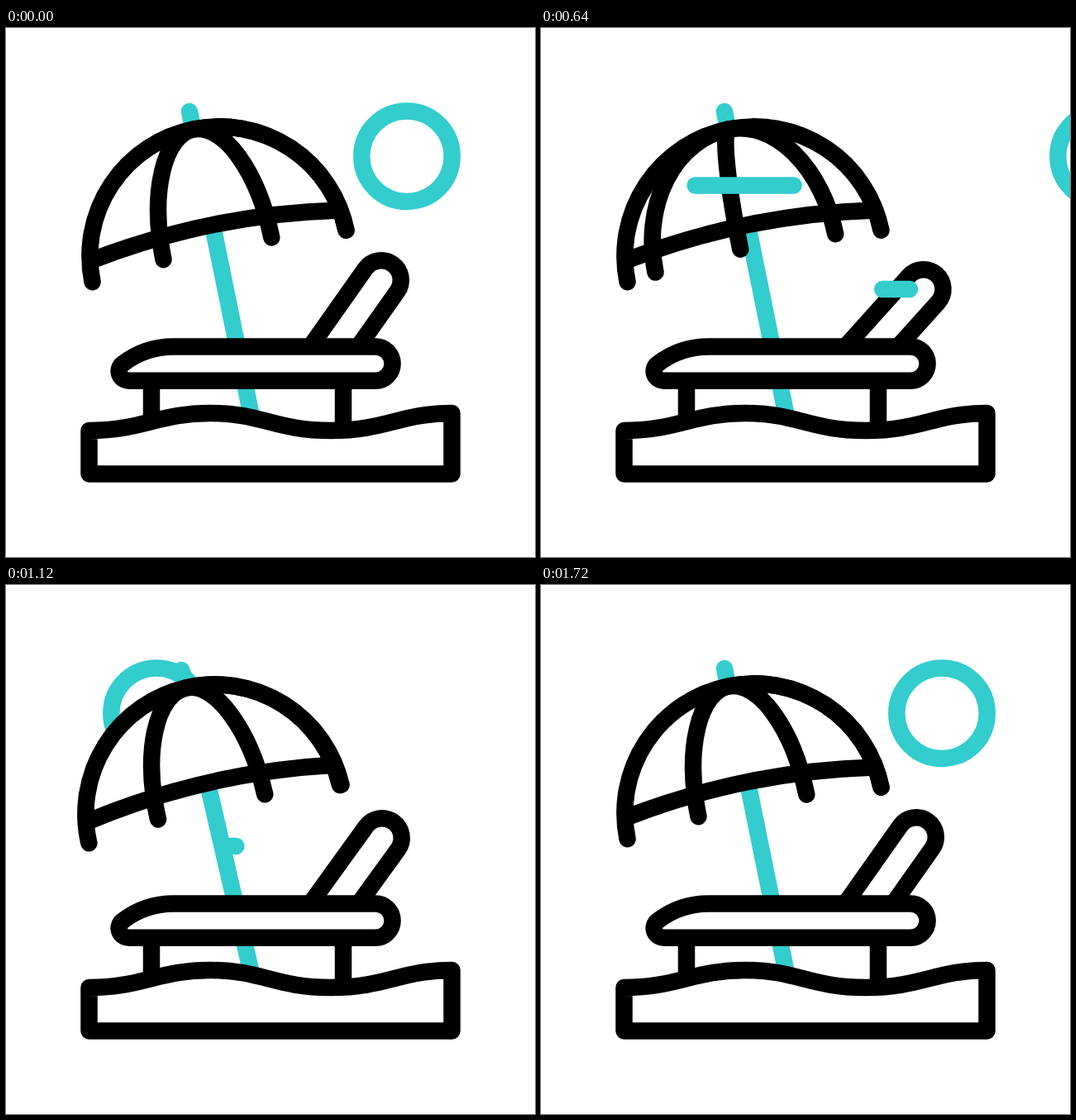
Write an HTML page that moves like this. It is 640 by 640 pixels and loops after 2000 ms.

```html
<!DOCTYPE html>
<html lang="en">
<head>
<meta charset="utf-8">
<title>Beach lounger</title>
<style>
  html, body { margin: 0; width: 100%; height: 100%; overflow: hidden; background: #fff; }
  svg { display: block; width: 100vw; height: 100vh; }
  .ink, .aqua { fill: none; stroke: #000; stroke-width: 20.5; stroke-linejoin: round; }
  .aqua { stroke: #33cdcd; }
  .round { stroke-linecap: round; }
  .solid { fill: #fff; }
</style>
</head>
<body>
<svg viewBox="0 0 640 640">
  <circle id="sun" class="aqua" cy="155.2" r="54.7"/>
  <g id="umbrella">
    <g class="aqua">
      <path d="M297 470L260 288"/>
      <path class="round" d="M260 288L222 101"/>
    </g>
    <!-- canopy axes: x along the rim, y down, origin at the rim centre -->
    <g transform="translate(258 276) rotate(-11.5)" class="ink round">
      <path fill="#fff" stroke="none" d="M-155 -25.6A156.6 156.6 0 0 1 155 -25.6Q0 -52 -155 -25.6Z"/>
      <path d="M-156.6 0A156.6 156.6 0 0 1 156.6 0"/>
      <path d="M-153 -25.6Q0 -52 153 -25.6"/>
      <path id="ribs"/>
    </g>
  </g>
  <path id="back" class="ink" d="M365 390L434.6 291.3A23.7 23.7 0 0 1 473.4 318.7L424.4 388"/>
  <path class="ink" d="M176 427V474M408 427V487"/>
  <path class="ink solid" d="M447 385.5A20.6 20.6 0 0 1 447 426.7H149C137 426.7 132.5 413 141 406.5C157 394 178 385.5 203 385.5Z"/>
  <path class="ink solid" d="M100.5 487C165 487 185 466 247 466C310 466 325 487 393 487C460 487 478 466 539.5 466V539.5H100.5Z"/>
  <path id="gust1" class="aqua round"/>
  <path id="gust2" class="aqua round"/>
</svg>
<script>
  const LOOP = 2000, STEP = 40, RADIUS = 156.6;
  const $ = id => document.getElementById(id);
  const set = (id, name, value) => $(id).setAttribute(name, value);

  const ease = (f, from, to) => {
    const u = Math.min(1, Math.max(0, (f - from) / (to - from)));
    return u * u * (3 - 2 * u);
  };

  // keys: [step, value] pairs, eased between neighbours
  const track = (f, keys) => keys.slice(1).reduce(
    (v, [at, value], i) => v + (value - keys[i][1]) * ease(f, keys[i][0], at), keys[0][1]);

  const SWAY = [[1.5, 0], [10, 5.75], [22, -5.75], [31, 0]];
  const SPIN = [[4, 0], [16.7, 1], [29.3, 0]];
  const RECLINE = [[9, 0], [22, 12], [29, 0]];
  const RIBS = [[-67, -54.5], [66.5, -82], [RADIUS, -55.5]];

  // leaves accelerating on the right, returns braking from the left
  function sunX(f) {
    if (f < 20) {
      const v = Math.max(0, f - 1);
      return 485 + v * v * (0.906 - 0.0026 * v);
    }
    const v = Math.max(0, 42.3 - f);
    return 485 - v * v * (1.739 - 0.018 * v);
  }

  // quarter ellipse from the crown to the rim
  function rib(x) {
    const y = -11.5 * (1 - (x / RADIUS) ** 2);
    return `M0 ${-RADIUS}A${Math.abs(x)} ${RADIUS + y} 0 0 ${x > 0 ? 1 : 0} ${x} ${y}`;
  }

  function gust(id, p, x, y) {
    const head = x - 178 * ease(p, -2.1, 9.2);
    const tail = x - 178 * ease(p, 4.3, 14.5);
    set(id, 'd', tail - head > 0.1 ? `M${head} ${y}H${tail}` : '');
  }

  function draw(t) {
    const f = Math.floor(t % LOOP / STEP);
    const spin = track(f, SPIN);
    set('sun', 'cx', sunX(f));
    set('umbrella', 'transform', `rotate(${track(f, SWAY)} 297 470)`);
    set('ribs', 'd', RIBS.map(([x, shift]) => rib(x + shift * spin)).join(''));
    set('back', 'transform', `rotate(${track(f, RECLINE)} 365 385)`);
    gust('gust1', f - 8, 359, 190.5);
    gust('gust2', f - 15, 446, 316);
  }

  const start = performance.now();
  function tick() {
    draw(performance.now() - start);
    requestAnimationFrame(tick);
  }
  tick();
</script>
</body>
</html>
```
